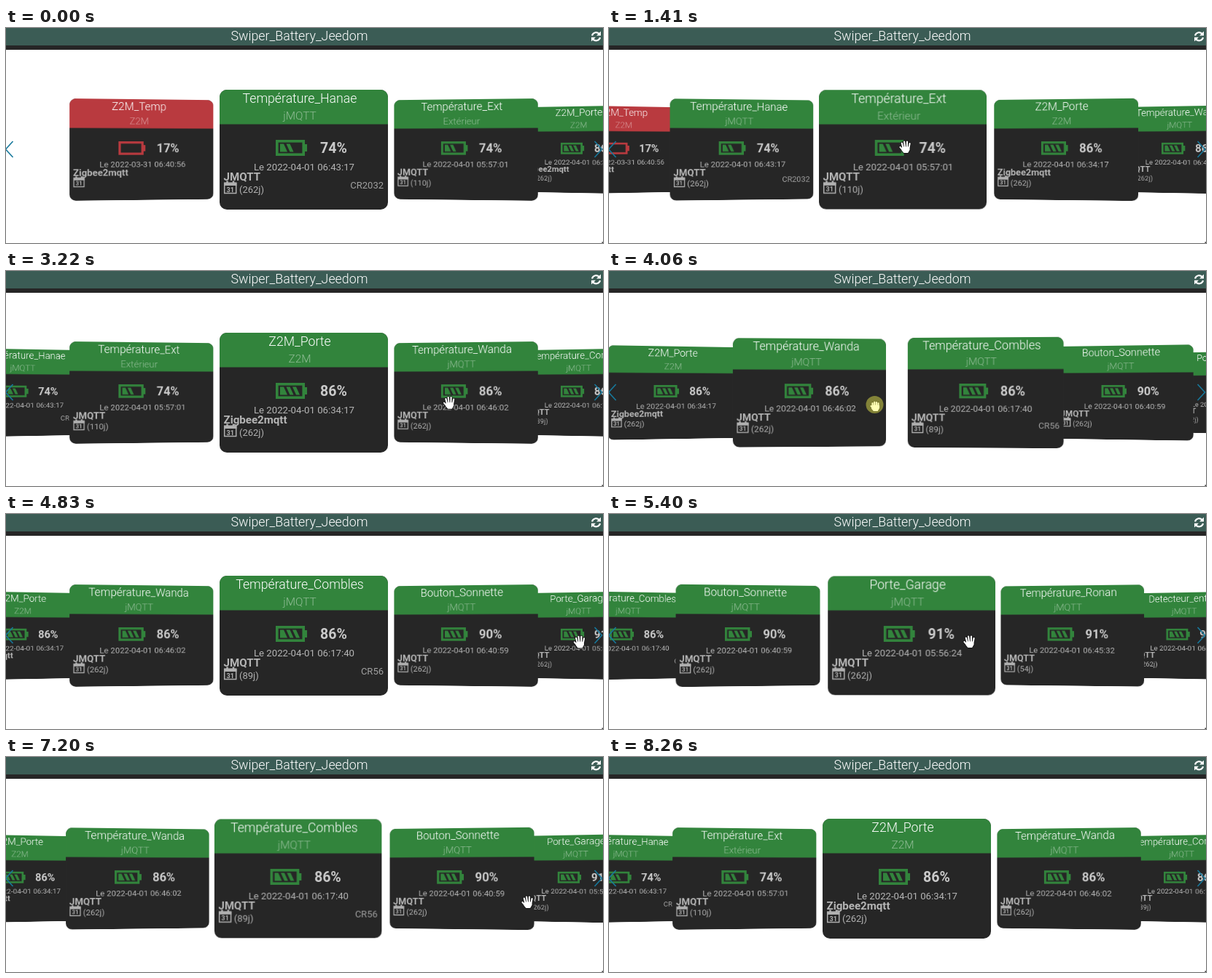
Animation, 819 px wide and 296 px high, one loop 9190 ms. Source, as an HTML page:

```html
<!DOCTYPE html>
<html lang="fr">
<head>
<meta charset="utf-8">
<title>Swiper_Battery_Jeedom</title>
<style>
  html, body { margin: 0; width: 100%; height: 100%; overflow: hidden; background: #fff; }
  svg { position: absolute; left: 0; top: 0; display: block; font-family: Roboto, sans-serif; }
  #stage, #cards { position: absolute; left: 0; top: 0; width: 819px; height: 296px; }
  #stage { overflow: hidden; perspective: 1200px; perspective-origin: 408.5px 167.5px; }
  #cards { transform-style: preserve-3d; }
  .card { position: absolute; left: 293px; top: 85px; width: 231px; height: 165px;
    border-radius: 10px; overflow: hidden; background: #262626; }
</style>
</head>
<body>
<div id="stage"><div id="cards"></div></div>
<svg width="819" height="296" viewBox="0 0 819 296">
  <rect width="819" height="24" fill="#3b5c55"/>
  <rect y="24" width="819" height="6" fill="#262626"/>
  <text x="402.5" y="17" text-anchor="middle" font-size="17.8" font-weight="300" fill="#fff">Swiper_Battery_Jeedom</text>
  <g fill="none" stroke="#fff" stroke-width="2.2">
    <path d="M804 10.5A5.6 5.6 0 0 1 814 8.5M815 13A5.6 5.6 0 0 1 805 15"/>
    <path d="M816 4.5V10.5H810ZM803 18.5V12.8H809Z" fill="#fff" stroke="none"/>
  </g>
  <path d="M9.5 156L-.5 167L9.5 178M807.5 156L817.5 167L807.5 178" fill="none" stroke="#17799c" stroke-width="1.6"/>
  <rect x="817.5" y="294.5" width="2" height="2" fill="#333"/>
  <g id="cursor" stroke-linecap="round" stroke-linejoin="round">
    <g id="open"></g>
    <g id="grab"></g>
  </g>
</svg>
<script>
const LOOP = 9190, STEP = 70, SNAP = 300, GLIDE = 380;
const SPACING = 263, DEPTH = 227.7, TILT = 11.4;
const $ = id => document.getElementById(id);
const clamp = v => Math.min(1, Math.max(0, v));
const smooth = s => s * s * (3 - 2 * s);
const mix = (a, b, s) => a + (b - a) * s;

// title, charge, date, days since change, battery type, room
const devices = [
  ['Z2M_Temp', 17, '03-31 06:40:56', '', '', 'Z2M'],
  ['Température_Hanae', 74, '04-01 06:43:17', 262, 'CR2032'],
  ['Température_Ext', 74, '04-01 05:57:01', 110, '', 'Extérieur'],
  ['Z2M_Porte', 86, '04-01 06:34:17', 262, '', 'Z2M'],
  ['Température_Wanda', 86, '04-01 06:46:02', 262],
  ['Température_Combles', 86, '04-01 06:17:40', 89, 'CR56'],
  ['Bouton_Sonnette', 90, '04-01 06:40:59', 262],
  ['Porte_Garage', 91, '04-01 05:56:24', 262],
  ['Température_Ronan', 91, '04-01 06:45:32', 54],
  ['Detecteur_entree', 91, '04-01 06:38:12', 262],
];

// Drags: press and release time, start and end x, y, slide that it snaps to
const drags = [
  [850, 1400, 675, 406, 163, 2],
  [1930, 2480, 616, 379, 176, 3],
  [3260, 4110, 774, 311, 184, 5],
  [4750, 5055, 810, 494, 175, 7],
  [5652, 6840, 215, 715, 199, 5],
  [7330, 7690, 200, 690, 212, 3],
  [8000, 8000, 700, 700, 312, 3], // leaves the stage
];

const text = (x, y, size, fill, value, extra = '') =>
  `<text x="${x}" y="${y}" font-size="${size}" fill="${fill}" ${extra}>${value}</text>`;
const MIDDLE = 'text-anchor="middle"', BOLD = 'font-weight="700"', LIGHT = 'font-weight="300"';

function battery(charge, color) {
  let bars = '';
  const count = charge > 80 ? 3 : charge > 50 ? 2 : 0;
  for (let i = 0; i < count; i++) bars += `M${6 + 8.5 * i} 5.5h5l5 11h${i ? -5 : -10}z`;
  return `<g transform="translate(77 69)" fill="${color}">
    <rect x="1.8" y="1.8" width="36.4" height="18.4" fill="none" stroke="${color}" stroke-width="3.6"/>
    <rect x="39" y="6" width="4" height="10"/><path d="${bars}"/></g>`;
}

const calendar = `<g fill="none" stroke="#b0b0b0" stroke-width="1.5">
  <rect x="6.7" y="128.2" width="16" height="14.3"/>
  <path d="M6 130H23.5" stroke-width="4"/><path d="M10.5 125.5V129M19 125.5V129" stroke-width="2.5"/></g>`
  + text(14.7, 140.5, 9, '#b0b0b0', '31', MIDDLE + BOLD);

const cards = devices.map(([title, charge, date, days, type = '', room = 'jMQTT']) => {
  const color = charge < 20 ? '#b93a3f' : '#32843c';
  const plugin = title.startsWith('Z2M') ? 'Zigbee2mqtt' : 'JMQTT';
  const card = document.createElement('div');
  card.className = 'card';
  card.innerHTML = `<svg width="231" height="165"><rect width="231" height="47.5" fill="${color}"/>`
    + text(110, 18, 17.7, '#fff', title, MIDDLE + LIGHT)
    + text(110, 41, 15.4, '#fff', room, MIDDLE + LIGHT + ' opacity=".45"')
    + battery(charge, color)
    + text(138, 87, 19.5, '#cacaca', charge + '%', BOLD)
    + text(116, 111, 13.2, '#b5b5b5', 'Le 2022-' + date, MIDDLE)
    + text(5.5, 125, 15.1, '#b5b5b5', plugin, BOLD)
    + calendar
    + (days && text(27, 142, 13, '#b0b0b0', `(${days}j)`))
    + text(225, 136, 13, '#a0a0a0', type, 'text-anchor="end"') + '</svg>';
  $('cards').append(card);
  return card;
});

const hand = fingers => [['#111', 3.8], ['#fff', 2.2]].map(([color, width]) =>
  `<path d="${fingers}M-3 1.5H5.5V4.5L3.5 8H-1L-3.5 5Z" fill="${color}" stroke="${color}" stroke-width="${width}"/>`).join('');
$('open').innerHTML = hand('M-2.5 2L-4.2 -4.5M0 1L-.9 -6.5M2.8 1L3 -6.5M5.5 2L6.6 -4M-3 5L-6.5 1');
$('grab').innerHTML = hand('M-3 1V-2M-.3 1V-3.3M2.4 1V-3.2M5 2V-1.8M-3 4L-5 2')
  + '<circle r="12" fill="#ffff50" fill-opacity=".43"/>';

function poseAt(t) {
  let slide = 1, x = 640, y = 312, free = 0;
  for (const [press, release, from, to, level, target] of drags) {
    if (t < press) {
      const start = Math.max(free, press - GLIDE), s = smooth(clamp((t - start) / (press - start)));
      return { slide, x: mix(x, from, s), y: mix(y, level, s), held: false };
    }
    if (t < release) {
      x = mix(from, to, smooth((t - press) / (release - press)));
      return { slide: slide + (from - x) / SPACING, x, y: level, held: true };
    }
    const dropped = slide + (from - to) / SPACING;
    slide = mix(target, dropped, (1 - clamp((t - release) / SNAP)) ** 3);
    [x, y, free] = [to, level, release];
  }
  return { slide, x, y, held: false };
}

function frameTime(time) {
  for (const halt of [6020, 2810]) time -= 130 * (time >= halt + 200) || Math.min(130, Math.max(0, time - halt - STEP + 1));
  return 500 + Math.floor((time - 500) / STEP) * STEP;
}

function draw(now) {
  const { slide, x, y, held } = poseAt(frameTime(now % LOOP));
  cards.forEach((card, i) => {
    const u = i - slide, away = Math.abs(u);
    card.style.display = away < 3.2 ? '' : 'none';
    card.style.zIndex = 10 - Math.round(away);
    card.style.transform = `translate3d(${u * SPACING}px, 0, ${-DEPTH * away}px) rotateY(${-TILT * u}deg)`;
  });
  $('cursor').setAttribute('transform', `translate(${x} ${y})`);
  $('open').style.display = held ? 'none' : '';
  $('grab').style.display = held ? '' : 'none';
}

const start = performance.now();
(function tick() {
  draw(performance.now() - start);
  requestAnimationFrame(tick);
})();
</script>
</body>
</html>
```
